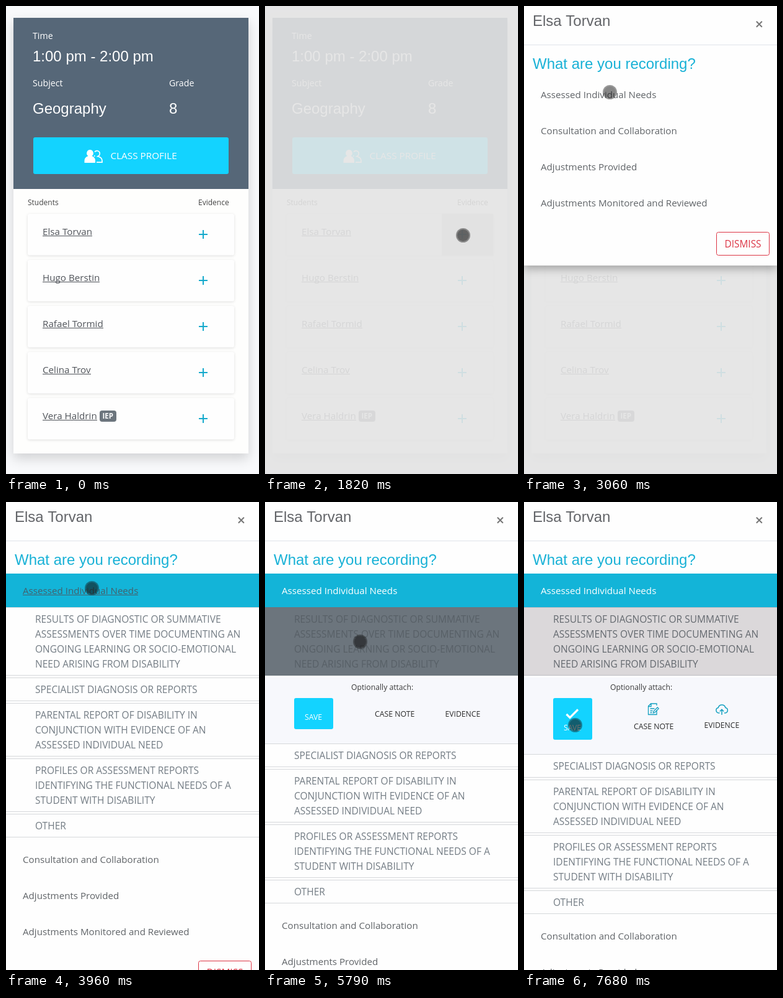
Recreate the animation shown at these times as an HTML page with a canvas. Size 408x752 px, loop 8 s.

```html
<!DOCTYPE html>
<html lang="en">
<head>
<meta charset="utf-8">
<title>Class evidence</title>
<style>
html, body { margin: 0; width: 100%; height: 100%; overflow: hidden; background: #f8f9fb; }
canvas { display: block; }
</style>
</head>
<body>
<canvas id="stage" width="408" height="752"></canvas>
<script>
const ctx = document.getElementById('stage').getContext('2d');
const LOOP = 8000;
const SANS = '"Open Sans", "Noto Sans", sans-serif';
const ARIAL = '"Liberation Sans", Arial, sans-serif';
const CYAN = '#13d3ff', TEAL = '#13b4d8', GREY = '#6c757d', INK = '#606468';
const LINE = 'rgba(108,117,125,.28)';
const students = ['Elsa Torvan', 'Hugo Berstin', 'Rafael Tormid', 'Celina Trov', 'Vera Haldrin'];
const topics = ['Assessed Individual Needs', 'Consultation and Collaboration',
  'Adjustments Provided', 'Adjustments Monitored and Reviewed'];
const needs = [
  ['RESULTS OF DIAGNOSTIC OR SUMMATIVE', 'ASSESSMENTS OVER TIME DOCUMENTING AN',
    'ONGOING LEARNING OR SOCIO-EMOTIONAL', 'NEED ARISING FROM DISABILITY'],
  ['SPECIALIST DIAGNOSIS OR REPORTS'],
  ['PARENTAL REPORT OF DISABILITY IN', 'CONJUNCTION WITH EVIDENCE OF AN', 'ASSESSED INDIVIDUAL NEED'],
  ['PROFILES OR ASSESSMENT REPORTS', 'IDENTIFYING THE FUNCTIONAL NEEDS OF A', 'STUDENT WITH DISABILITY'],
  ['OTHER']
];

// Pointer moves: start, end, from, to, easing
const easeOut = p => 1 - (1 - p) ** 1.38;
const easeInOut = p => p * p * (3 - 2 * p);
const moves = [
  [370, 580, [418, 350], [302, 363], easeOut],
  [750, 960, [302, 363], [319.5, 368.5], easeInOut],
  [2000, 2200, [319.5, 368.5], [315, 369], easeInOut],
  [2340, 3060, [315, 369], [138.5, 138.5], easeOut],
  [4440, 4790, [138.5, 138.5], [153.5, 224.5], easeInOut],
  [6860, 7510, [153.5, 224.5], [82.5, 358.5], easeInOut]
];
const presses = [[1480, 2000], [3960, 4080], [5620, 5900], [7680, LOOP]];

const ramp = (t, a, b) => Math.min(1, Math.max(0, (t - a) / (b - a)));
const mix = (a, b, p) => `rgb(${a.map((v, i) => Math.round(v + (b[i] - v) * p))})`;

function rect(x, y, w, h, fill, r = 0) {
  ctx.fillStyle = fill;
  ctx.beginPath();
  ctx.roundRect(x, y, w, h, r);
  ctx.fill();
}

function disc(x, y, r, fill) {
  ctx.fillStyle = fill;
  ctx.beginPath();
  ctx.arc(x, y, r, 0, 7);
  ctx.fill();
}

function shadowRect(x, y, w, h, fill, r, dy, blur, alpha) {
  ctx.save();
  ctx.shadowColor = `rgba(0,0,0,${alpha})`;
  ctx.shadowBlur = blur;
  ctx.shadowOffsetY = dy;
  rect(x, y, w, h, fill, r);
  ctx.restore();
}

function text(str, x, y, size, color, font = SANS, weight = 400) {
  ctx.font = `${weight} ${size}px ${font}`;
  ctx.fillStyle = color;
  ctx.fillText(str, x, y);
}

function link(str, x, y, size, color, underline = true) {
  text(str, x, y, size, color);
  if (underline) ctx.fillRect(x, y + 1, Math.round(ctx.measureText(str).width), 1);
}

function stroke(path, color, width, x = 0, y = 0) {
  ctx.save();
  ctx.translate(x, y);
  ctx.strokeStyle = color;
  ctx.lineWidth = width;
  ctx.stroke(new Path2D(path));
  ctx.restore();
}

function peopleIcon() {
  ctx.fillStyle = '#fff';
  ctx.fill(new Path2D('M135.5 231a5.5 5.5 0 0 1 3 10q5.5 2 5.5 7.5v3.5h-17.5v-3.5q0-5.5 6-7.5a5.5 5.5 0 0 1 3-10z'));
  stroke('M143 234.5a4.6 4.6 0 1 1 3.5 7.3M142 241.5l1.5-1M149 242q6 1.5 6 7v2.2h-9', '#fff', 1.7);
}

function drawClass(t) {
  rect(0, 0, 408, 752, '#f8f9fb');
  shadowRect(12, 19, 379, 700, '#fefefd', 0, 8, 18, .16);
  rect(12, 19, 379, 275, '#566778');
  text('Time', 43, 53, 14.2, '#fff');
  text('1:00 pm - 2:00 pm', 43, 89, 24, '#fff', ARIAL);
  text('Subject', 43, 129, 14.2, '#fff');
  text('Grade', 263, 129, 14.2, '#fff');
  text('Geography', 43, 173, 24, '#fff', ARIAL);
  text('8', 263, 173, 24, '#fff', ARIAL);
  rect(44, 211, 315, 59, CYAN, 3);
  peopleIcon();
  text('CLASS PROFILE', 168.5, 246, 15.3, '#fff');
  text('Students', 35, 320, 12, '#444');
  text('Evidence', 310, 320, 12, '#444');
  students.forEach((name, i) => {
    const y = 334 + i * 74;
    shadowRect(35, y, 333, 66.5, '#fefefe', 3, 1, 4, .13);
    if (i === 0 && t >= 1480) rect(285, y, 83, 67, '#d2d6db');
    link(name, 59, y + 34, 15.2, '#50545a');
    stroke('M311 0h14M318-7v14', '#14a9cc', 2, 0, y + 33);
  });
  rect(151, 650, 27, 18, GREY, 4);
  text('IEP', 155.5, 663.3, 11.5, '#fff', SANS, 700);
}

function drawAttach(icons) {
  rect(0, 282, 408, icons ? 123 : 106, '#f7f8fc');
  text('Optionally attach:', 139, 302, 12.2, '#3a3a3a');
  rect(47, 315, 63, icons ? 67 : 50, CYAN, 3);
  text('SAVE', 64, icons ? 367 : 350, 12.3, '#fff');
  text('CASE NOTE', 177, icons ? 365 : 345, 12.3, '#2c2c2c');
  text('EVIDENCE', 290.5, icons ? 363 : 345, 12.2, '#2c2c2c');
  if (!icons) return;
  stroke('M68.5 341l5.5 5.5 13-13', '#fff', 3.2);
  stroke('M214 334v7.5h-13.5v-13.5l4-4h9.5v3M200.5 328.5h4.5v-4.5M203.5 332h7M203.5 335.5h4M203.5 338.5h3M208.5 339l.7-3 6-6 2 2-6 6z', '#14a0c0', 1.3);
  stroke('M315.5 339h-1.5a4.3 4.3 0 0 1-.7-8.5a6 6 0 0 1 11.6 0a4.3 4.3 0 0 1-.5 8.5h-1.5M319 342v-8.5M315.8 336.5l3.2-3.2 3.2 3.2', '#14a0c0', 1.5);
}

function drawNeeds(t) {
  const attach = t >= 5720, icons = t >= 6270;
  const shift = icons ? 123 : attach ? 106 : 0;
  const lit = ramp(t, 3960, 4100);
  rect(0, 115, 408, 54, TEAL);
  link(topics[0], 27, 148, 15.15, mix([66, 96, 108], [255, 255, 255], lit), t < 5620);

  const dark = [108, 117, 125], pale = [219, 216, 218];
  if (t >= 5620) {
    rect(0, 169, 408, 110, t < 5790
      ? mix([254, 254, 254], dark, ramp(t, 5620, 5750))
      : mix(dark, pale, ramp(t, 5800, 5930)));
  }
  if (attach) drawAttach(icons);

  let top = 169;
  needs.forEach((lines, i) => {
    const y = top + (i ? shift : 0);
    const h = lines.length * 24 + 13;
    const color = i || t < 5620 ? '#737c84' : mix([88, 96, 103], [100, 105, 111], ramp(t, 5800, 5930));
    rect(0, y, 408, 1, LINE);
    rect(0, y + h, 408, 1, LINE);
    lines.forEach((line, n) => text(line, 47, y + 25 + n * 24, 15.53, color));
    top += h + 4;
  });
  return 374 + shift;
}

function drawModal(t) {
  const shown = ramp(t, 1930, 2080);
  if (!shown) return;
  const open = t >= 3960;
  ctx.save();
  ctx.globalAlpha = shown;
  ctx.translate(0, -50 * (1 - ramp(t, 1930, 2200)) ** 2);
  shadowRect(0, -60, 408, open ? 900 : 477, '#fefefe', 0, 5, 14, .3);
  text(students[0], 14, 32, 24, '#626468', ARIAL);
  stroke('M374.8 24.8l9 9M383.8 24.8l-9 9', '#777', 2);
  rect(0, 62, 408, 1, '#e0e3ea');
  text('What are you recording?', 14, 101, 24, '#18b1d6', ARIAL);
  let drop = 0;
  if (open) drop = drawNeeds(t);
  else link(topics[0], 27, 148, 15.15, INK, t >= 3790);
  topics.slice(1).forEach((name, i) => text(name, 27, 206 + i * 58 + drop, 15.15, INK));
  ctx.strokeStyle = '#dc3545';
  ctx.lineWidth = 1;
  ctx.beginPath();
  ctx.roundRect(310.5, 363.5 + drop, 85, 37, 3);
  ctx.stroke();
  text('DISMISS', 323.5, 388 + drop, 15.4, '#dc3545');
  ctx.restore();
}

function drawPointer(t) {
  const move = moves.findLast(m => t >= m[0]);
  if (!move) return;
  const [start, end, from, to, ease] = move;
  const p = ease(ramp(t, start, end));
  const [x, y] = from.map((v, i) => v + (to[i] - v) * p);
  const down = presses.some(([a, b]) => t >= a && t < b);
  disc(x, y, 11.5, 'rgba(20,20,20,.43)');
  disc(x, y, 9.5, `rgba(20,20,20,${down ? .32 : .14})`);
}

function frame(now) {
  const t = now % LOOP;
  drawClass(t);
  if (t >= 1820) rect(0, 0, 408, 752, 'rgba(228,228,228,.9)');
  drawModal(t);
  drawPointer(t);
  requestAnimationFrame(frame);
}
requestAnimationFrame(frame);
</script>
</body>
</html>
```
